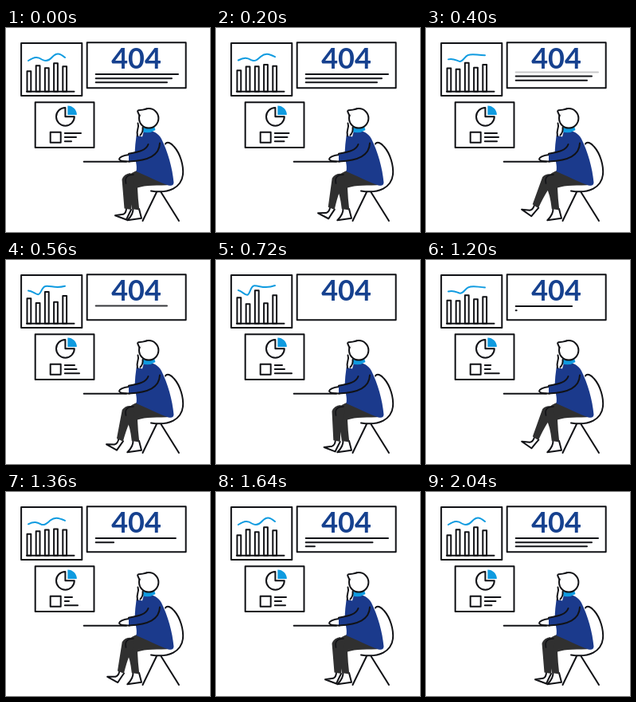
Recreate the animation shown at these times as an HTML page with a canvas. Size 256 px wide and 256 px high, loop 2080 ms.

```html
<!DOCTYPE html>
<html lang="en">
<head>
<meta charset="utf-8">
<title>404</title>
<style>
html, body { margin: 0; width: 100%; height: 100%; overflow: hidden; background: #fff; }
canvas { display: block; width: 256px; height: 256px; }
</style>
</head>
<body>
<canvas id="stage"></canvas>
<script>
const LOOP = 2080, STEP = 40, PEN = 2;
const INK = '#111216', NAVY = '#1b3a8c', TITLE = '#16418f', SKY = '#109be0', PANTS = '#303030', WHITE = '#fff';
const canvas = document.getElementById('stage');
const ratio = window.devicePixelRatio || 1;
canvas.width = canvas.height = 256 * ratio;
const ctx = canvas.getContext('2d');

const clamp = v => Math.max(0, Math.min(1, v));
const mix = (a, b, p) => a + (b - a) * p;
const ease = (t, from, to) => (1 - Math.cos(Math.PI * clamp((t - from) / (to - from)))) / 2;

const TIMES = [0, 400, 720, 1000, 1360, 1640, LOOP];
function track(t, values) {
  let i = 0;
  while (t >= TIMES[i + 1]) i++;
  return mix(values[i], values[i + 1], (t - TIMES[i]) / (TIMES[i + 1] - TIMES[i]));
}

function shape(d, fill, stroke = INK, width = PEN) {
  const path = new Path2D(d);
  if (fill) { ctx.fillStyle = fill; ctx.fill(path); }
  if (stroke) { ctx.strokeStyle = stroke; ctx.lineWidth = width; ctx.stroke(path); }
}
const line = (x1, y1, x2, y2) => shape(`M${x1} ${y1}L${x2} ${y2}`);

function box(x, y, w, h) {
  ctx.beginPath();
  ctx.rect(x, y, w, h);
  ctx.fillStyle = WHITE;
  ctx.fill();
  ctx.strokeStyle = INK;
  ctx.lineWidth = PEN;
  ctx.stroke();
}

function chart(t) {
  box(19.1, 19.1, 76.2, 65.9);
  const p = t < 750 ? ease(t, 0, 750) : 1 - ease(t, 760, 1640);
  [[54, 47], [47, 55], [50, 38], [44, 54], [48, 44]].forEach(([a, b], i) => {
    const top = mix(a, b, p) + .3;
    box(26.5 + i * 11.2, top, 4.8, 79.8 - top);
  });
  line(26, 79.8, 85.5, 79.8);
  const m = (a, b) => mix(a, b, p);
  shape(`M28 ${m(41, 38)}
    C${m(36, 33)} ${m(36, 39)} ${m(40, 36)} ${m(36, 44.5)} ${m(45, 39.5)} ${m(39.5, 43.8)}
    C${m(50, 43)} ${m(42.5, 43)} ${m(54, 43)} ${m(41, 32.5)} ${m(58, 48)} ${m(36.5, 32.3)}
    C${m(63, 55)} ${m(31, 32)} ${m(67, 61)} ${m(31, 37)} 74 ${m(37, 32)}`, null, SKY);
}

function message(t) {
  box(101.7, 18.3, 124, 57);
  ctx.fillStyle = TITLE;
  ctx.font = 'bold 36px Lato, sans-serif';
  ctx.textAlign = 'center';
  ctx.fillText('404', 163.5, 50.7);

  const ends = [217, 209, 203];
  const typing = [[835, 1425], [1160, 1780], [1520, 2040]];
  const lift = 14 * ease(t, 285, 690);
  ends.forEach((end, i) => {
    const y = 58.1 + i * 5.1;
    if (t < 760) {
      ctx.globalAlpha = clamp(1 - (lift - i * 5.1) / 3.4);
      if (ctx.globalAlpha > 0) line(112.7, y - lift, end - 1, y - lift);
      ctx.globalAlpha = 1;
    } else {
      const p = ease(t, ...typing[i]);
      if (p > 0) line(112.7, y, mix(112.7, end - 1, p), y);
    }
  });
}

function report(t) {
  box(36.7, 93.2, 73.8, 56.8);
  shape('M74.4 99.9A11.4 11.4 0 1 0 85.8 111.3H74.4Z', WHITE);
  shape('M77.4 97.5A11.4 11.4 0 0 1 88.8 108.9H77.4Z', SKY, null);
  box(55.7, 130.8, 13, 13);
  [[94, 89, 83, 79, 83, 88, 94],
   [88, 91, 86, 83, 79, 82, 88],
   [82, 89, 95, 94, 90, 87, 82]].forEach((ends, i) => {
    const y = 132 + i * 5.1;
    line(73.8, y, track(t, ends), y);
  });
}

function chair() {
  shape('M200 145.5C202 142 207 144 211 149C219 158 223 173 222 184C220 200 205 208 182 204.4', null);
  line(189, 206, 171.5, 242);
  line(194.5, 206, 217, 242);
}

function legs(t) {
  const u = t < 790 ? t / 790 : clamp((t - 790) / 780);
  const swing = (1 - Math.cos(2 * Math.PI * u)) / 2;
  const turn = 24.5 * swing * Math.PI / 180;

  // planted leg
  shape('M159.5 226Q160 234 152.3 241.3L170 238.8L167 227', WHITE);
  shape('M208 197C190 198 175 197 165 200.5Q165.5 214 167.3 228.5L157.8 227Q156 209 150 197Q150 184 164 179L190 182Z', PANTS, null);

  // swinging foot follows the ankle but tilts less than the shin
  ctx.save();
  ctx.translate(153 - 37 * Math.sin(turn), 190 + 37 * Math.cos(turn));
  ctx.rotate(turn * .6);
  shape('M-2 -1Q-2 5 -6 6.8L-16 8.3L-2 13.5Q1 7 4 1', WHITE);
  ctx.restore();

  ctx.save();
  ctx.translate(153, 190);
  ctx.rotate(turn);
  ctx.translate(-153, -190);
  shape('M145.5 190Q148 183 156 182L162 190Q157 201 157 228L148.5 226.5Z', PANTS, null);
  ctx.restore();
  shape('M160 184Q148 184 150.5 195', null, INK, 1.6);
}

function person(t) {
  legs(t);
  shape('M173 129C182 128 190 130 195 139C203 155 209 176 210.5 194Q210 199 204 197.5C191 193 177 185.5 163.5 180C165 172 162 166 161.5 158Q162 146 163.7 134.5L171 136.5Z', NAVY, null);
  shape('M171 124Q178 128 186 123.5L187.5 128Q179 133.5 171 130Z', SKY, null);
  shape('M165.5 119.5Q166.8 123 165.3 127Q164 131 165 135.5L169 135L172.3 129L171 123Z', WHITE, null);
  shape('M165.5 119.5Q166.8 123 165.3 127Q164 131 165 135.5', null);
  shape('M171.5 125Q172.5 130 168.5 134.5', null);

  ctx.beginPath();
  ctx.arc(179.2, 113.3, 12.2, 0, 7);
  ctx.fillStyle = WHITE;
  ctx.fill();
  ctx.strokeStyle = INK;
  ctx.lineWidth = PEN;
  ctx.stroke();
  shape('M176 101.6Q172 102.7 166.5 103.3Q164.8 103.8 165.3 105.2L167.5 110', WHITE);

  // resting arm, hand and desk
  shape('M154 159.2C147 159.8 142.5 161.5 142 164.6Q142.5 167.5 154 167.6Z', WHITE, null);
  shape('M154.5 159C147 160 142.5 161.5 142 164.6Q142.5 167.6 155 167.4', null);
  shape('M154 157.5L165 155L166 167L154 168Z', NAVY, null);
  shape('M178.5 146C176 153 168 155.5 154 157.7', null);
  shape('M193 144.5C192.5 160 179 166 154.5 167.6', null);
  line(97.7, 167.8, 151, 167.8);
}

function draw(t) {
  ctx.setTransform(ratio, 0, 0, ratio, 0, 0);
  ctx.fillStyle = WHITE;
  ctx.fillRect(0, 0, 256, 256);
  ctx.lineCap = ctx.lineJoin = 'round';
  chart(t);
  message(t);
  report(t);
  chair();
  person(t);
}

const start = performance.now();
function frame() {
  const t = Math.floor((performance.now() - start) / STEP) * STEP % LOOP;
  draw(t);
  requestAnimationFrame(frame);
}
frame();
</script>
</body>
</html>
```
